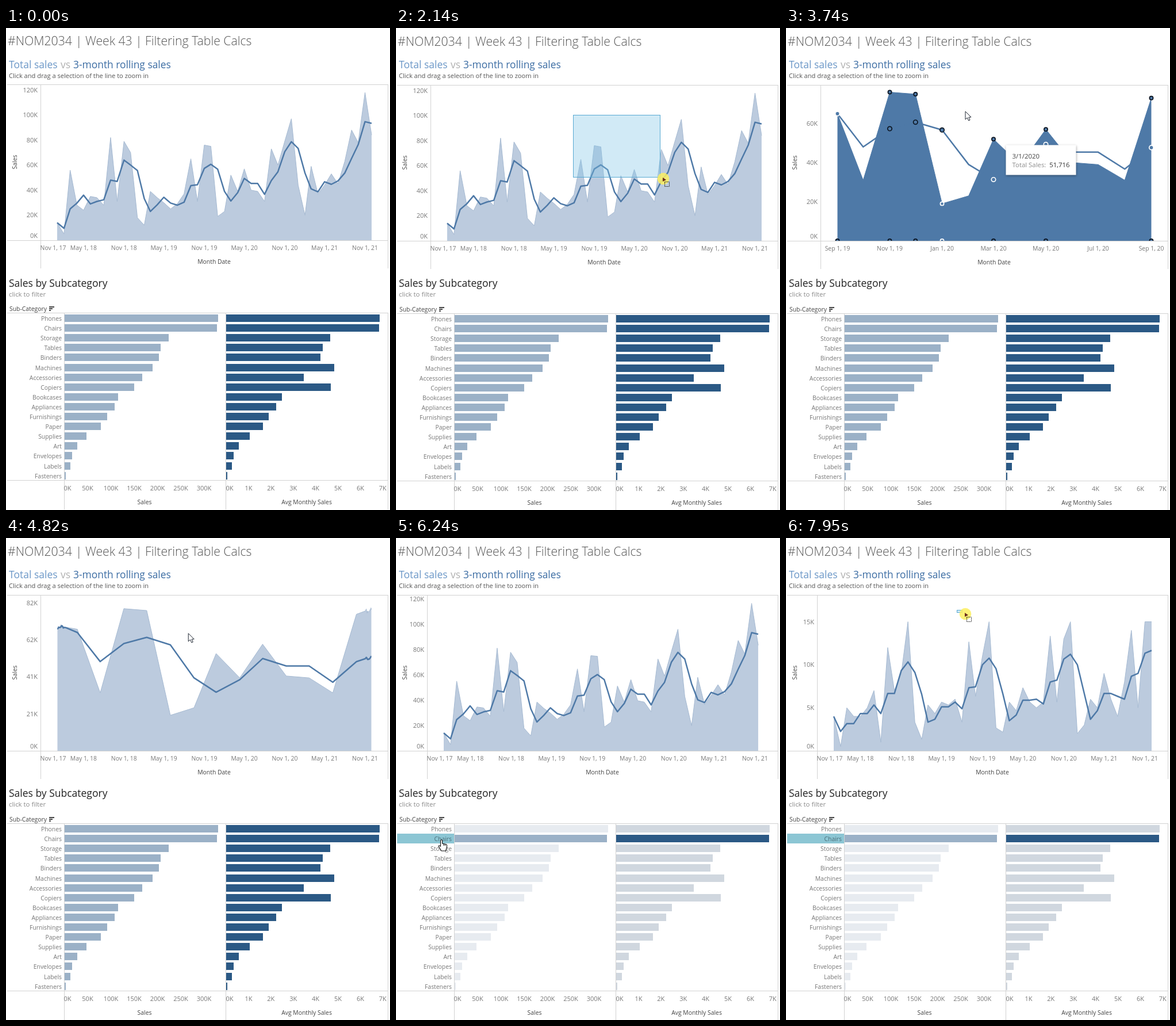
Recreate the animation shown at these times as an HTML page with a canvas. Size 668 by 838 pixels, loop 7.99 s.

```html
<!DOCTYPE html>
<html lang="en">
<head>
<meta charset="utf-8">
<title>Filtering Table Calcs</title>
<style>
  html, body { margin: 0; width: 100%; height: 100%; overflow: hidden; background: #fff; }
  canvas { display: block; }
</style>
</head>
<body>
<canvas id="stage" width="668" height="838"></canvas>
<script>
const c = document.getElementById('stage').getContext('2d');
const LOOP = 7990, BLUE = '#4e79a7', GRID = '#d2d2d2', GREY = '#777', DARK = '#444';
const YELLOW = 'rgba(252,238,95,.85)', BLACK = '#0b1420';

const lerp = (a, b, p) => a + (b - a) * p;
const clamp = (v, a, b) => Math.min(b, Math.max(a, v));
const ease = t => 1 - (1 - clamp(t, 0, 1)) ** 1.5;
const within = (t, a, b) => t >= a && t < b;

// Monthly sales in thousands from January 2018
const TOTAL = [
  14, 5, 56, 28, 24, 35, 34, 28, 82, 31, 79, 70, 18, 12, 39, 34, 30, 25, 29, 37, 65, 31, 76, 75,
  19, 23, 52, 39, 57, 40, 39, 31, 73, 60, 79, 97, 44, 20, 59, 37, 44, 53, 45, 63, 88, 78, 118, 84];
// Chairs: a seasonal year that drifts from its early to its late shape
const EARLY = [4, .5, 5, 4, 4, 5, 7, 1, 12, 7, 9, 15], LATE = [2, 3, 6, 5, 9, 6, 4, 8, 14, 5, 15, 15];
const CHAIRS = TOTAL.map((_, i) => lerp(EARLY[i % 12], LATE[i % 12], Math.floor(i / 12) / 3));

const SALES = {
  Phones: 330, Chairs: 328.5, Storage: 224, Tables: 207, Binders: 203, Machines: 189,
  Accessories: 167, Copiers: 149.5, Bookcases: 115, Appliances: 107.5, Furnishings: 92,
  Paper: 78.5, Supplies: 47, Art: 27, Envelopes: 16.5, Labels: 12.5, Fasteners: 3 };
// Subcategories that did not sell in all 48 months
const MONTHS = { Machines: 39, Copiers: 32, Bookcases: 46, Supplies: 45 };

// Vertical scale of each view: top of the axis and distance of its ticks
const ALL = { max: 124, tick: 20 }, ZOOM = { max: 79.4, tick: 20 }, CHAIR = { max: 18.05, tick: 5 };
const FIRST = 20, LAST = 32, PICKED = [20, 22, 23, 24, 26, 28, 32];

// Pointer path: time, x, y
const PATH = [
  [410, 618, 830], [490, 618, 819], [770, 618, 819], [1240, 265, 240], [1570, 308, 151], [2140, 465, 262],
  [2950, 465, 260], [3590, 365, 215], [3740, 312, 145], [4770, 312, 145], [5260, 362, 345],
  [5860, 79, 525], [6260, 79, 525], [7000, 307, 168], [7370, 307, 168], [7610, 297, 125],
  [7950, 312, 132], [LOOP, 312, 132]];

const day = i => (Date.UTC(2018, i, 1) - Date.UTC(2018, 0, 1)) / 864e5;
const fullX = (i, left) => lerp(left + 29, 636, day(i) / 1430);
const zoomX = i => lerp(89.5, 635.5, (day(i) - day(FIRST)) / 366);

function rolling(data, i, from = 0) {
  const part = data.slice(Math.max(from, i - 2), i + 1);
  return part.reduce((a, b) => a + b) / part.length;
}

function text(s, x, y, size = 10.4, color = GREY, align = 'left', weight = 400) {
  c.font = `${weight} ${size}px "Open Sans", "Noto Sans", sans-serif`;
  c.fillStyle = color;
  c.textAlign = align;
  c.fillText(s, x, y + size * .36);
}

function rect(x, y, w, h, color) {
  c.fillStyle = color;
  c.fillRect(x, y, w, h);
}

function shape(points, fill, stroke, width = 1) {
  c.beginPath();
  points.forEach(([x, y]) => c.lineTo(x, y));
  if (fill) { c.closePath(); c.fillStyle = fill; c.fill(); }
  if (stroke) { c.strokeStyle = stroke; c.lineWidth = width; c.stroke(); }
}

function dot(x, y, r, fill, ring) {
  c.beginPath();
  c.arc(x, y, r, 0, 7);
  c.fillStyle = fill;
  c.fill();
  if (ring) { c.strokeStyle = ring; c.lineWidth = 1.7; c.stroke(); }
}

function pointer(t) {
  const n = PATH.findIndex(k => k[0] > t);
  const [a, b] = [PATH[n - 1], PATH[n]], p = (t - a[0]) / (b[0] - a[0]);
  return [lerp(a[1], b[1], p), lerp(a[2], b[2], p)];
}

function header(dy) {
  text('#NOM2034', 3, 22 + dy, 21.2, '#555', 'left', 300);
  text('| Week 43 | Filtering Table Calcs', 121, 22 + dy, 21.2, '#555', 'left', 300);
  text('Total sales', 5, 64, 17.5, '#6b97c7');
  text('vs', 95, 64, 17.5, '#b0b0b0');
  text('3-month rolling sales', 117, 64, 17.4, '#3b6ca3');
  text('Click and drag a selection of the line to zoom in', 5, 83, 11.1, '#555');
  text('Sales by Subcategory', 5, 444, 17.5, '#222');
  text('click to filter', 5, 463, 11.4, '#8a8a8a');
}

function bars(t, dy) {
  const picked = t >= 5960;
  c.save();
  c.translate(0, dy);
  text('Sub-Category', 6, 488, 10.4, DARK);
  [9, 6, 3].forEach((w, i) => rect(75, 484 + i * 3, w, 2, DARK));
  if (picked) rect(2, 513, 99, 17, '#8cc6d4');
  Object.entries(SALES).forEach(([name, sales], i) => {
    const y = Math.round(505 + i * 17.1), dim = picked && name !== 'Chairs';
    const monthly = sales / (MONTHS[name] || 48);
    text(name, 97, y, 10.4, picked && !dim ? '#4c6e78' : GREY, 'right');
    rect(102, y - 7, Math.round(sales * .808), 13, dim ? '#e7ebf0' : '#9bb1c7');
    rect(383, y - 7, Math.round(monthly * 38.85), 13, dim ? '#d0d7df' : '#2b5985');
  });
  [495, 786].forEach(y => rect(2, y, 662, 1, GRID));
  [101, 382, 664].forEach(x => rect(x, 495, 1, 342, GRID));
  for (let k = 0; k < 7; k++) text(k * 50 + 'K', k ? 101.5 + k * 40.5 : 107, 800, 11, GREY, 'center');
  for (let k = 0; k < 8; k++) text(k + 'K', k ? 383 + k * 38.9 : 389, 800, 11, GREY, 'center');
  text('Sales', 241, 824, 10.4, DARK, 'center');
  text('Avg Monthly Sales', 523, 824, 10.4, DARK, 'center');
  c.restore();
}

// Area and rolling line as lists of points, p of the way from all sales to the other view
function marks(chairs, p, base) {
  const y = (v, view) => base - 270 * v / view.max;
  const area = [], line = [];
  TOTAL.forEach((v, i) => {
    const a0 = y(v, ALL), l0 = y(rolling(TOTAL, i), ALL);
    if (chairs) {
      const x = lerp(fullX(i, 60) - 6, fullX(i, 54), p);
      area.push([x, lerp(a0, y(CHAIRS[i], CHAIR), p)]);
      line.push([x, lerp(l0, y(rolling(CHAIRS, i), CHAIR), p)]);
      return;
    }
    // Months outside the selection collapse onto its ends
    const j = clamp(i, FIRST, LAST), inside = i === j;
    const x = lerp(fullX(i, 60), zoomX(j), inside ? p : 1 - (1 - p) ** 1.45);
    const k = inside ? p + .22 * p * (1 - p) : 1 - (1 - p) ** 1.65;
    area.push([x, lerp(a0, y(TOTAL[j], ZOOM), k)]);
    line.push([x, lerp(l0, y(rolling(TOTAL, j, FIRST), ZOOM), k)]);
  });
  return { area, line };
}

function axes(t, base, left, view, p) {
  const top = base - 271;
  [top, base].forEach(y => rect(2, y, 663, 1, GRID));
  [left, 664].forEach(x => rect(x, top, 1, 320, GRID));

  const px = v => 270 * v.tick / v.max;
  const step = lerp(px(ALL), px(view), p), max = lerp(ALL.max, view.max, p);
  for (let k = 0; k < 7; k++) {
    const y = k ? base - k * step : base - 8;
    if (y > top + 5) text(Math.round(k * step * max / 270) + 'K', left - 5, y, 11, GREY, 'right');
  }

  const zoomed = within(t, 2840, 4770);
  const [from, to, gap] = zoomed ? [FIRST, LAST, 2] : [-2, 46, 6];
  for (let i = from; i <= to; i += gap) {
    const month = new Date(Date.UTC(2018, i, 1)).toLocaleString('en', { month: 'short', timeZone: 'UTC' });
    const x = zoomed ? zoomX(i) : Math.max(left + 22, fullX(i, left));
    text(`${month} 1, ${18 + Math.floor(i / 12)}`, x, base + 13, 10.4, GREY, 'center');
  }
  text('Month Date', (left + 664) / 2, base + 37, 10.4, DARK, 'center');
  c.save();
  c.translate(15, base - 136);
  c.rotate(-Math.PI / 2);
  text('Sales', 0, 0, 10.4, DARK, 'center');
  c.restore();
}

function chart(t, dy) {
  const base = 369 + dy, chairs = t >= 6240, left = chairs ? 54 : 60;
  const p = chairs ? ease((t - 6234) / 620)
    : t >= 4770 ? 1 - ease((t - 4770) / 500) : ease((t - 2840) / 540);
  const solid = within(t, 2560, 4440);
  const { area, line } = marks(chairs, p, base);

  c.save();
  c.beginPath();
  c.rect(left, base - 271, 605, 272);
  c.clip();
  c.lineJoin = 'round';
  shape([[area[0][0], base], ...area, [area[47][0], base]], solid ? BLUE : '#bccbde');
  shape(area, null, solid ? BLUE : '#a6bad2');
  shape(line, null, BLUE, 2.5);
  if (solid) PICKED.forEach(i => {
    const [x, y] = area[i], ring = i === 24 ? '#fff' : BLACK;
    dot(x, y, 3.1, BLUE, ring);
    dot(x, base, 3.1, BLUE, ring);
    dot(x, line[i][1], 3.7, BLUE, within(i, 22, 25) ? BLACK : '#fff');
  });
  if (within(t, 5250, 5380)) [area[23][1], base].forEach(y => dot(area[23][0], y, 2.4, BLACK));
  c.restore();
  axes(t, base, left, chairs ? CHAIR : ZOOM, p);
}

function tooltip(x, y, date, value) {
  c.save();
  c.shadowColor = 'rgba(0,0,0,.35)';
  c.shadowBlur = 4;
  c.shadowOffsetY = 1;
  rect(x, y, 122, 52, '#fff');
  c.restore();
  text(date, x + 11, y + 19, 11.4, DARK);
  text('Total Sales:', x + 11, y + 34.5, 11.4, '#8c8c8c');
  text(value, x + 111, y + 34.5, 11.4, '#333', 'right', 500);
}

function hand(x, y) {
  c.save();
  c.translate(x, y);
  const outline = new Path2D('M-1.5 1Q0-2 1.5 1V6L8 7.5Q10 8 9.5 12L7.5 19H0L-5 11Q-5 8.5-1.5 11ZM4 7V10M6.5 7V10');
  c.fillStyle = '#fff';
  c.fill(outline);
  c.strokeStyle = '#111';
  c.lineWidth = 1.1;
  c.stroke(outline);
  c.restore();
}

function arrow(x, y) {
  const tip = [[0, 0], [0, 14], [3.3, 11], [5.6, 16], [8, 15], [5.8, 10.2], [10, 10], [0, 0]];
  shape(tip.map(([a, b]) => [x + a, y + b]), '#fff', '#1c2430');
}

function frame(x, y, w, h, color) {
  c.strokeStyle = color;
  c.lineWidth = 1;
  c.strokeRect(Math.round(x) + .5, Math.round(y) + .5, w, h);
}

function drag(x0, y0, x, y) {
  const w = Math.max(0, x - 6 - x0), h = Math.max(0, y - 3 - y0);
  rect(x0, y0, w, h, 'rgba(125,195,228,.35)');
  frame(x0, y0, w, h, '#58a9d2');
  dot(x, y, 10.3, YELLOW);
  shape([[x - 1, y - 2], [x + 5, y + 2], [x - 1, y + 5]], '#6b2a1c');
  c.setLineDash([1.5, 1]);
  frame(x + 2, y + 5, 8, 8, '#111');
  c.setLineDash([]);
}

function cursor(t) {
  if (t < 410) return;
  const [x, y] = pointer(t);
  if (within(t, 1570, 2560)) return drag(308, 151, x, y);
  if (t >= 7610) return drag(297, 125, x, y);
  if (within(t, 4300, 4440) || within(t, 5860, 5960)) dot(x, y, 10.3, YELLOW);
  (within(t, 5200, 5330) || within(t, 5560, 6400) ? hand : arrow)(x, y);
}

function draw() {
  const t = performance.now() % LOOP, dy = t < 1570 ? 0 : 1;
  rect(0, 0, 668, 838, '#fff');
  header(dy);
  chart(t, dy);
  bars(t, dy);
  if (within(t, 3650, 4440)) tooltip(382.5, 203.5, '3/1/2020', '51,716');
  if (within(t, 5250, 5380)) tooltip(379.5, 332.5, '12/1/2019', '74,920');
  cursor(t);
  requestAnimationFrame(draw);
}
draw();
</script>
</body>
</html>
```
